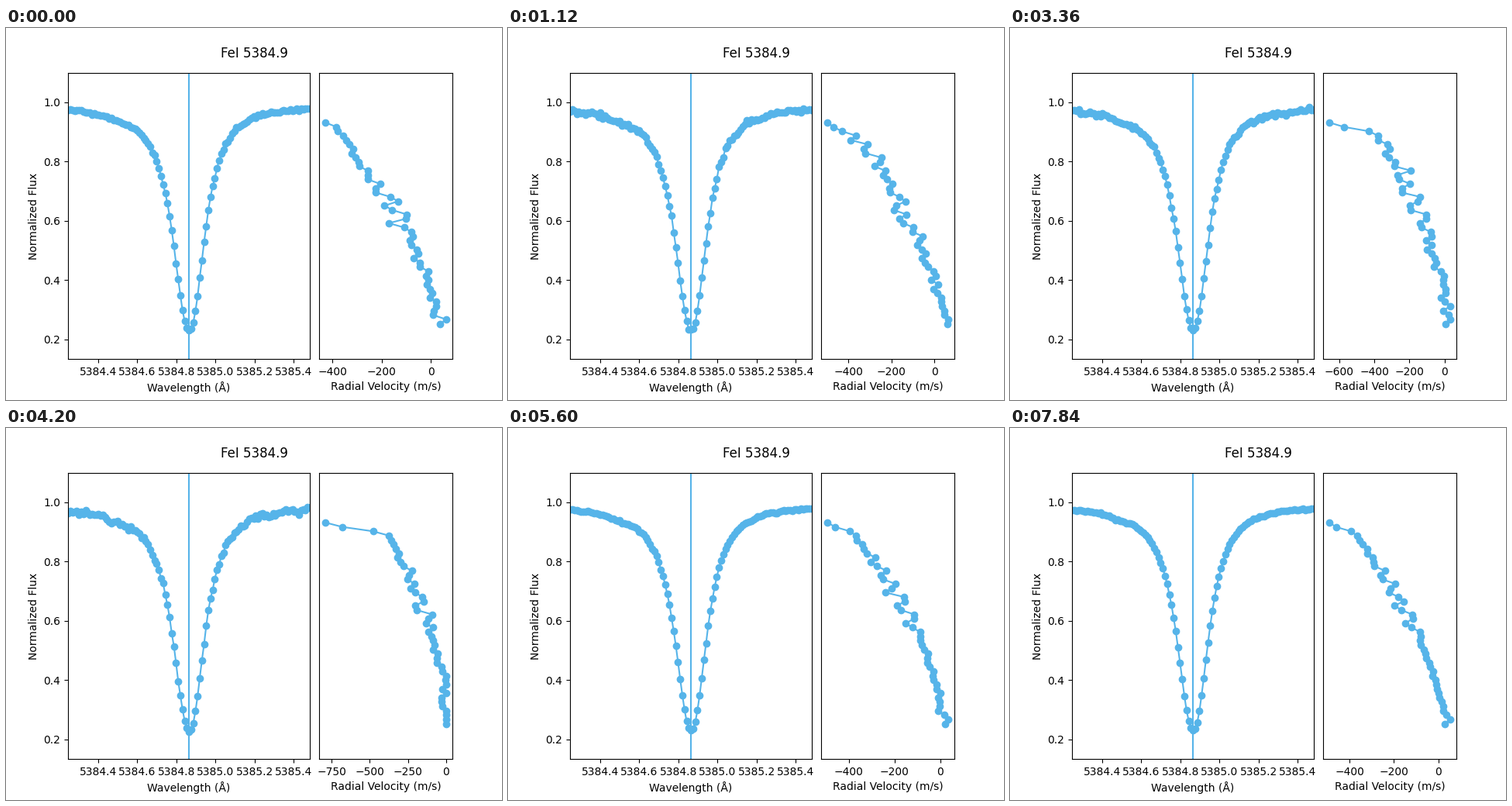
These frames come from a looping animation (640 by 480 pixels, 8 s). A matplotlib script:

```python
import numpy as np
import matplotlib.pyplot as plt
from matplotlib.animation import FuncAnimation

BLUE = "#56b4e9"
CENTER, HALF_WIDTH, PIXEL = 5384.864, 0.6185, 0.01102
TICK_MS, TICKS, TICKS_PER_STEP = 40, 200, 7

# Key observations: noise and the velocities (m/s) at the two ends of the bisector
KEY_STEPS = [0, 4, 8, 15, 20, 24, 28]
NOISE = [.003, .0045, .004, .005, .0015, .002, .0015]
LOWEST = [-428, -497, -474, -791, -493, -400, -491]
HIGHEST = [63, 65, 74, 2, 36, 35, 54]

pixels = np.arange(-57, 58)
levels = np.arange(47)
CORE = 45  # level of the highest velocity
bisector_flux = np.linspace(.9317, .253, len(levels))


def bump(x, center, width):
    return np.exp(-((x - center) / width) ** 2)


def line_profile():
    """Absorption line with a slightly wider blue side and a weak blend."""
    blue = pixels < 0
    width = np.where(blue, 8.96, 8.53)
    power = np.where(blue, 2.1, 2.25)
    depth = .759 / (1 + (np.abs(pixels) / width) ** power)
    return .99 - depth - .009 * bump(pixels, -34, 6)


def mean_bisector():
    """Blueshift fading towards the core, with a slowing ripple half way."""
    trend = 25 - 440 * (1 - levels / levels[-1]) ** 1.6
    phase = 11.1 * np.log((levels + 22.3) / 33.3)
    ripple = 33 * bump(levels, 18, 10) * np.cos(2 * np.pi * phase)
    return trend + ripple + 26 * bump(levels, CORE, 1)


mean_flux = line_profile()
mean_velocity = mean_bisector()


def spectrum(noise, rng):
    dimming = 3 * max(0, noise - .003)
    scatter = noise * np.sqrt(mean_flux) * rng.standard_normal(len(pixels))
    return mean_flux * (1 - dimming) + scatter


def bisector(noise, lowest, highest, rng):
    velocity = mean_velocity + 4000 * noise * rng.standard_normal(len(levels))
    velocity += (lowest - velocity[0]) * bump(levels, 0, 1.7)
    velocity += (highest - velocity[CORE]) * (levels / CORE) ** 4
    return np.clip(velocity, lowest, highest)


fig, (line_ax, rv_ax) = plt.subplots(
    1, 2, figsize=(6.4, 4.8), dpi=100,
    gridspec_kw=dict(width_ratios=[2, 1.1], wspace=0.05))
fig.suptitle("FeI 5384.9", y=0.95)

line_ax.set(xlim=(CENTER - HALF_WIDTH, CENTER + HALF_WIDTH), ylim=(0.134, 1.1),
            xlabel="Wavelength (Å)", ylabel="Normalized Flux",
            xticks=5384.4 + 0.2 * np.arange(6), yticks=[.2, .4, .6, .8, 1.0])
line_ax.xaxis.set_major_formatter("{x:.1f}")
line_ax.axvline(CENTER, color=BLUE)
rv_ax.set(ylim=(0.134, 1.1), xlabel="Radial Velocity (m/s)")
rv_ax.tick_params(left=False, labelleft=False)

line_plot, = line_ax.plot(CENTER + PIXEL * pixels, mean_flux, "o-", color=BLUE)
rv_plot, = rv_ax.plot(mean_velocity, bisector_flux, "o-", color=BLUE)


def update(tick):
    step = tick // TICKS_PER_STEP
    rng = np.random.default_rng(step)
    noise, lowest, highest = (np.interp(step, KEY_STEPS, values)
                              for values in (NOISE, LOWEST, HIGHEST))
    line_plot.set_ydata(spectrum(noise, rng))
    rv_plot.set_xdata(bisector(noise, lowest, highest, rng))
    margin = 0.05 * (highest - lowest)
    rv_ax.set_xlim(lowest - margin, highest + margin)
    return line_plot, rv_plot


anim = FuncAnimation(fig, update, frames=TICKS, interval=TICK_MS,
                     repeat=True, repeat_delay=0, cache_frame_data=False)
plt.show()
```
